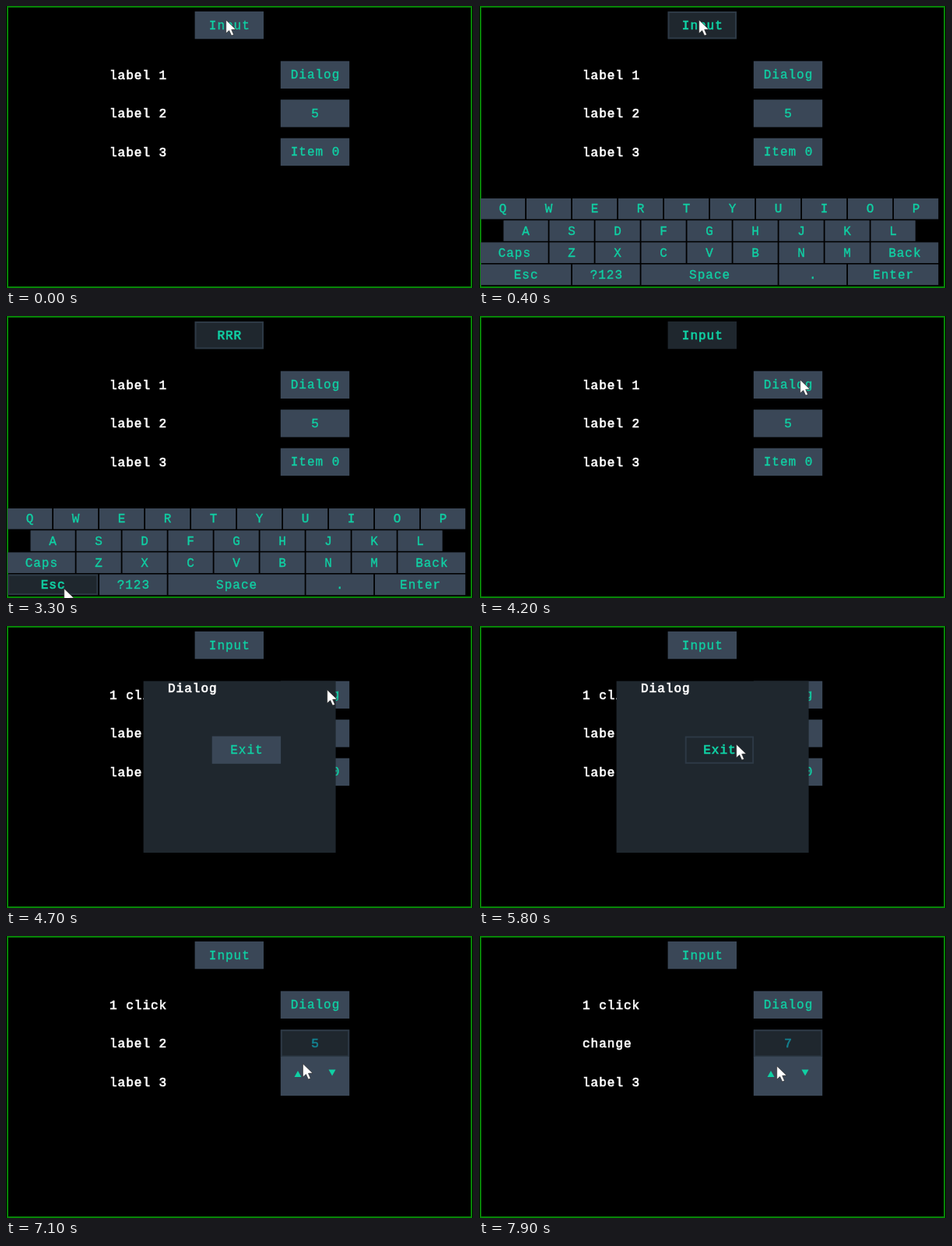
Write an HTML page with a canvas that moves like this. It is 600 px wide and 362 px high and loops after 8 s.

```html
<!DOCTYPE html>
<html lang="en">
<head>
<meta charset="utf-8">
<title>Widget demo</title>
<style>
  html, body { margin: 0; width: 100%; height: 100%; overflow: hidden; background: #000; }
  canvas { display: block; }
</style>
</head>
<body>
<canvas id="stage" width="600" height="362"></canvas>
<script>
const ctx = document.getElementById('stage').getContext('2d');
const LOOP = 8000, STEP = 100;
const SLATE = '#3a4757', DARK = '#1f272e', EDGE = '#2d3945', MINT = '#10d0a4', WHITE = '#fff';
const BOLD = 0.7, MEDIUM = 0.35;
const rowY = i => 70.7 + 49.5 * i;

// Pointer moves, starting on the Input button
const home = { x: 282, y: 18 };
const moves = [
  { from: 600, to: 1400, x: 209, y: 257 },
  { from: 2300, to: 2800, x: 74, y: 350 },
  { from: 3500, to: 4200, x: 412, y: 82 },
  { from: 4900, to: 5400, x: 330, y: 152 },
  { from: 5900, to: 6400, x: 372, y: 143 },
  { from: 6900, to: 7300, x: 382, y: 167 }
];
const arrow = new Path2D('M0 0V17L4 13.5 7 20 9.8 18.8 7 12.3 12.5 12Z');

const rows = [
  [...'QWERTYUIOP'],
  [...'ASDFGHJKL'],
  ['Caps', ...'ZXCVBNM', 'Back'],
  ['Esc', '?123', 'Space', '.', 'Enter']
];
// Key widths in half keys; all others are 2
const wide = { Caps: 3, Back: 3, Esc: 4, '?123': 3, Space: 6, '.': 3, Enter: 4 };

function text(s, x, y, color, weight, align = 'left') {
  ctx.font = '16px "Liberation Mono", monospace';
  ctx.letterSpacing = '1px';
  ctx.textAlign = align;
  ctx.fillStyle = ctx.strokeStyle = color;
  ctx.lineWidth = weight;
  ctx.fillText(s, x, y + 5);
  ctx.strokeText(s, x, y + 5);
}

function rect(x, y, w, h, color) {
  ctx.fillStyle = color;
  ctx.fillRect(x, y, w, h);
}

function button(s, x, y, { w = 88.4, h = 35.3, dark = false, edge = dark, color = MINT } = {}) {
  rect(x, y, w, h, dark ? DARK : SLATE);
  if (edge) {
    ctx.strokeStyle = EDGE;
    ctx.lineWidth = 2;
    ctx.strokeRect(x + 1, y + 1, w - 2, h - 2);
  }
  text(s, x + w / 2 + 0.5, y + h / 2, color, dark ? BOLD : MEDIUM, 'center');
}

function keyboard(pressed) {
  const unit = 29.5;
  rows.forEach((keys, r) => {
    let x = r === 1 ? 2 + unit : 2;
    for (const key of keys) {
      const w = (wide[key] || 2) * unit;
      button(key, x, 247 + r * 28.2, { w: w - 1.8, h: 26.6, dark: key === pressed });
      x += w;
    }
  });
}

function triangle(x, y, dir) {
  ctx.fillStyle = MINT;
  ctx.beginPath();
  ctx.moveTo(x, y - 4 * dir);
  ctx.lineTo(x + 4.5, y + 4 * dir);
  ctx.lineTo(x - 4.5, y + 4 * dir);
  ctx.fill();
}

function pointer(t) {
  let { x, y } = home;
  for (const m of moves) {
    const k = Math.min(1, Math.max(0, (t - m.from) / (m.to - m.from)));
    const e = 1 - (1 - k) ** 3;
    x += (m.x - x) * e;
    y += (m.y - y) * e;
  }
  ctx.save();
  ctx.translate(x + 0.7, y);
  ctx.fillStyle = WHITE;
  ctx.fill(arrow);
  ctx.strokeStyle = '#222';
  ctx.lineWidth = 0.6;
  ctx.stroke(arrow);
  ctx.restore();
}

function draw(t) {
  const during = (a, b) => t >= a && t < b;
  const typing = during(300, 3500);
  const spinning = t >= 6800;
  const typed = Math.min(3, Math.floor((t - 1900) / 200) + 1);
  const value = t < 7400 ? '5' : t < 7700 ? '6' : '7';
  const labels = [t < 4700 ? 'label 1' : '1 click', t < 7400 ? 'label 2' : 'change', 'label 3'];

  rect(0, 0, 600, 362, '#000');
  ctx.strokeStyle = '#078507';
  ctx.lineWidth = 2;
  ctx.strokeRect(2, 1, 596, 360);

  button(during(1900, 3500) ? 'R'.repeat(typed) : 'Input', 242.6, 7,
    { dark: during(300, 4600), edge: typing });
  labels.forEach((s, i) => text(s, 133, rowY(i) + 17.8, WHITE, BOLD));

  const right = 352.8;
  button('Dialog', right, rowY(0), { dark: during(4600, 4700) });
  button(value, right, rowY(1), { dark: spinning, color: spinning ? '#14808f' : MINT });
  if (spinning) {
    rect(right, 155, 88.4, 50, SLATE);
    triangle(375, 177, 1);
    triangle(419, 175.5, -1);
  } else {
    button('Item 0', right, rowY(2));
  }

  if (typing) keyboard(during(3200, 3500) ? 'Esc' : '');
  if (during(4700, 5900)) {
    rect(176.6, 70.7, 247, 220.3, DARK);
    text('Dialog', 208, 79.5, WHITE, BOLD);
    button('Exit', 264.7, 141.5, { dark: t >= 5800 });
  }
  pointer(t);
}

function tick() {
  draw(Math.floor(performance.now() % LOOP / STEP) * STEP);
  requestAnimationFrame(tick);
}
tick();
</script>
</body>
</html>
```
